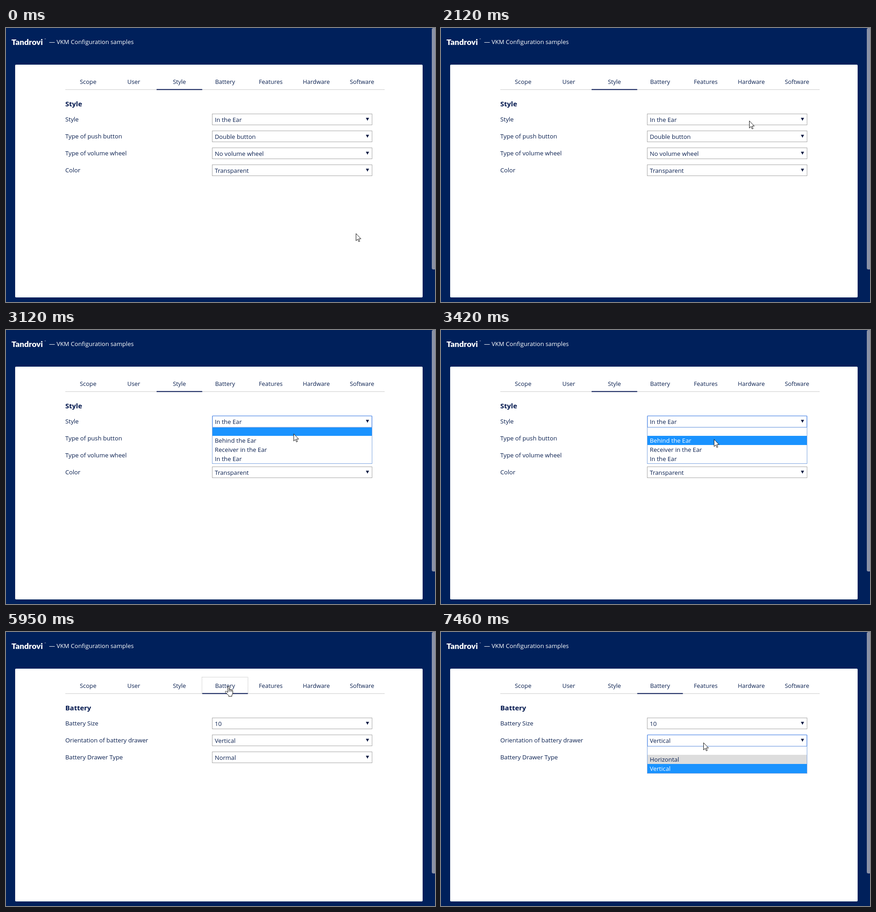
An HTML page for the animation above (8000 ms loop, 937 by 598 pixels).

```html
<!DOCTYPE html>
<html lang="en">
<head>
<meta charset="utf-8">
<title>Configuration samples</title>
<style>
  html, body { margin: 0; width: 937px; height: 598px; overflow: hidden; background: #00205b; }
  svg { display: block; }
  text { font: 13.2px "Open Sans", "Noto Sans", sans-serif; fill: #0a2050; }
  .tab { font-size: 12.9px; text-anchor: middle; }
  .title { font-size: 15px; font-weight: 700; fill: #00164d; }
  .light { fill: #fff; }
  .head { font-size: 13.1px; text-anchor: end; }
  .brand { font: 900 17.5px Lato, sans-serif; }
  .tm { font-size: 4px; }
</style>
</head>
<body>
<svg width="937" height="598" viewBox="0 0 937 598">
  <rect width="937" height="598" fill="#00205b"/>
  <rect x="930" y="0" width="9" height="527" rx="3.5" fill="#8a91a6"/>
  <text class="brand light" x="12" y="37">Tandrovi</text>
  <text class="tm light" x="84" y="26">™</text>
  <text class="head light" x="279" y="35">— VKM Configuration samples</text>
  <rect x="20" y="80" width="890" height="508" rx="2" fill="#fff"/>
  <g id="app"></g>
  <g id="cursor"></g>
</svg>
<script>
const LOOP = 8000;
const TABS = ['Scope', 'User', 'Style', 'Battery', 'Features', 'Hardware', 'Software'];
const TAB_X = 129.5, TAB_W = 99.7, ROW_Y = 187, ROW_H = 37;

const STYLE = ['Style', 'Type of push button', 'Type of volume wheel', 'Color'];
const BATTERY = ['Battery Size', 'Orientation of battery drawer', 'Battery Drawer Type'];
const BEFORE = ['In the Ear', 'Double button', 'No volume wheel', 'Transparent'];
const AFTER = ['Behind the Ear', 'Double button', 'Analog volume wheel', 'Beige'];
const CELL = ['10', 'Vertical', 'Normal'];
const EARS = ['', 'Behind the Ear', 'Receiver in the Ear', 'In the Ear'];
const TURNS = ['', 'Horizontal', 'Vertical'];

const linear = p => p;
const out = p => 1 - (1 - p) ** 2;
const inOut = p => p * p * (3 - 2 * p);

// Pointer moves: first step, last step, number of steps, end x, end y, easing
const MOVES = [
  [800, 800, 1, 768, 447, linear],
  [860, 1400, 10, 673, 191, inOut],
  [1600, 1600, 1, 673, 195, linear],
  [1730, 1790, 2, 673, 203, linear],
  [2120, 2120, 1, 673, 202, linear],
  [2700, 2820, 3, 660, 214, linear],
  [2880, 3420, 10, 596, 238, linear],
  [4810, 4810, 1, 571, 213, linear],
  [4870, 5420, 9, 484, 118, out],
  [6350, 7140, 13, 571, 244, inOut],
  [7200, 7260, 2, 572, 241, linear],
  [7460, 7460, 1, 573, 241, linear]
];

function pointer(t) {
  let x = 764, y = 448;
  for (const [from, to, n, ex, ey, ease] of MOVES) {
    if (t < from) break;
    const gap = n > 1 ? (to - from) / (n - 1) : 1;
    const p = ease(Math.min(n, Math.floor((t - from) / gap + 1e-6) + 1) / n);
    x += (ex - x) * p;
    y += (ey - y) * p;
  }
  return { x: Math.round(x), y: Math.round(y) };
}

const text = (x, y, s, cls = '') => `<text class="${cls}" x="${x}" y="${y}">${s}</text>`;
const rect = (x, y, w, h, attrs) => `<rect x="${x}" y="${y}" width="${w}" height="${h}" ${attrs}/>`;

function tabs(active, outlined) {
  const x = TAB_X + active * TAB_W;
  return rect(TAB_X, 134, 697.5, 1, 'fill="#ccc"') +
    TABS.map((s, i) => text(TAB_X + (i + .5) * TAB_W, 122, s, 'tab')).join('') +
    (outlined ? rect(428, 98.5, 100.5, 36, 'fill="none" stroke="#aaa" stroke-dasharray="1 1"') : '') +
    rect(x, 133.3, TAB_W, 2, 'fill="#0a1a55"');
}

function field(i, label, value, focused) {
  const y = ROW_Y + i * ROW_H;
  const edge = focused
    ? rect(450.8, y + .5, 348.5, 25, 'rx="1" fill="#fff" stroke="#6c9bea" stroke-width="1.7"')
    : rect(450.5, y + .5, 349, 24, 'fill="#fff" stroke="#a6a6a6"');
  return text(129.5, y + 17, label) + edge + text(456, y + 18, value) +
    `<path d="M786 ${y + 9}h7l-3.5 6.5z" fill="#0a1a45"/>`;
}

function list(i, options, lit, grey) {
  const top = ROW_Y + i * ROW_H + 24;
  const bottom = top + 20 * options.length;
  let s = rect(450.5, top + 1.5, 349, bottom - top - 1, 'fill="#fff" stroke="#7ba3e0"');
  options.forEach((name, k) => {
    const y = top + 20 * k, cut = k ? 0 : 2;
    const fill = k === lit ? '#1a93ff' : k === grey ? '#ddd' : '';
    if (fill) s += rect(451, y + cut, 348, 20 - cut, `fill="${fill}"`);
    s += text(456, y + 15, name, k === lit ? 'light' : '');
  });
  return s;
}

const RESET = '<g fill="none" stroke="#8791a8"><circle cx="809.5" cy="199.5" r="5.6"/>' +
  '<path d="M806 196l7 7m0-7l-7 7"/></g>';

function app(t, at) {
  const battery = t >= 5950, chosen = t >= 3950;
  const labels = battery ? BATTERY : STYLE;
  const values = battery ? CELL : chosen ? AFTER : BEFORE;
  const focus = t >= 7460 ? 1 : t >= 2380 && t < 5820 ? 0 : -1;
  let s = tabs(battery ? 3 : 2, t >= 5820 && t < 7460) +
    text(129.5, 171, battery ? 'Battery' : 'Style', 'title') +
    labels.map((label, i) => field(i, label, values[i], i === focus)).join('');
  if (chosen && !battery) s += RESET;
  if (t >= 2440 && !chosen) s += list(0, EARS, at.y >= 231 ? 1 : at.y > 214 ? 0 : 3);
  if (t >= 7460) s += list(1, TURNS, 2, 1);
  return s;
}

const ARROW = '<path d="M.5.7V16.3L4.1 12.9L6.4 18.4L8.7 17.4L6.4 12.1H11.3Z"/>';
const HAND = '<path d="M6.5 14V2.2Q6.5.6 8 .6T9.5 2.2V7.5Q9.5 6.3 11 6.5T12.3 8' +
  'Q12.5 7.2 13.8 7.6T15 9Q15.3 8.4 16.3 8.8T17.3 10.5V15Q17 18 15.3 20V22.4H8.3V20.5' +
  'Q5 17 1.4 13.6Q.5 12.2 1.5 11.4T4 11.7Z"/><path d="M9.5 7.5V12M12.3 8V12M15 9V12.5"/>';

function cursor(t, { x, y }) {
  if (t >= 600 && t < 800) return '';
  const hand = y < 135;
  return `<g transform="translate(${hand ? x - 6 : x} ${y})" fill="#fff" stroke="#111">${hand ? HAND : ARROW}</g>`;
}

const shown = {};
function put(id, html) {
  if (shown[id] !== html) document.getElementById(id).innerHTML = shown[id] = html;
}

function draw(t) {
  const at = pointer(t);
  put('app', app(t, at));
  put('cursor', cursor(t, at));
}

const start = performance.now();
function tick(now) {
  draw(Math.max(0, now - start) % LOOP);
  requestAnimationFrame(tick);
}
draw(0);
requestAnimationFrame(tick);
</script>
</body>
</html>
```
